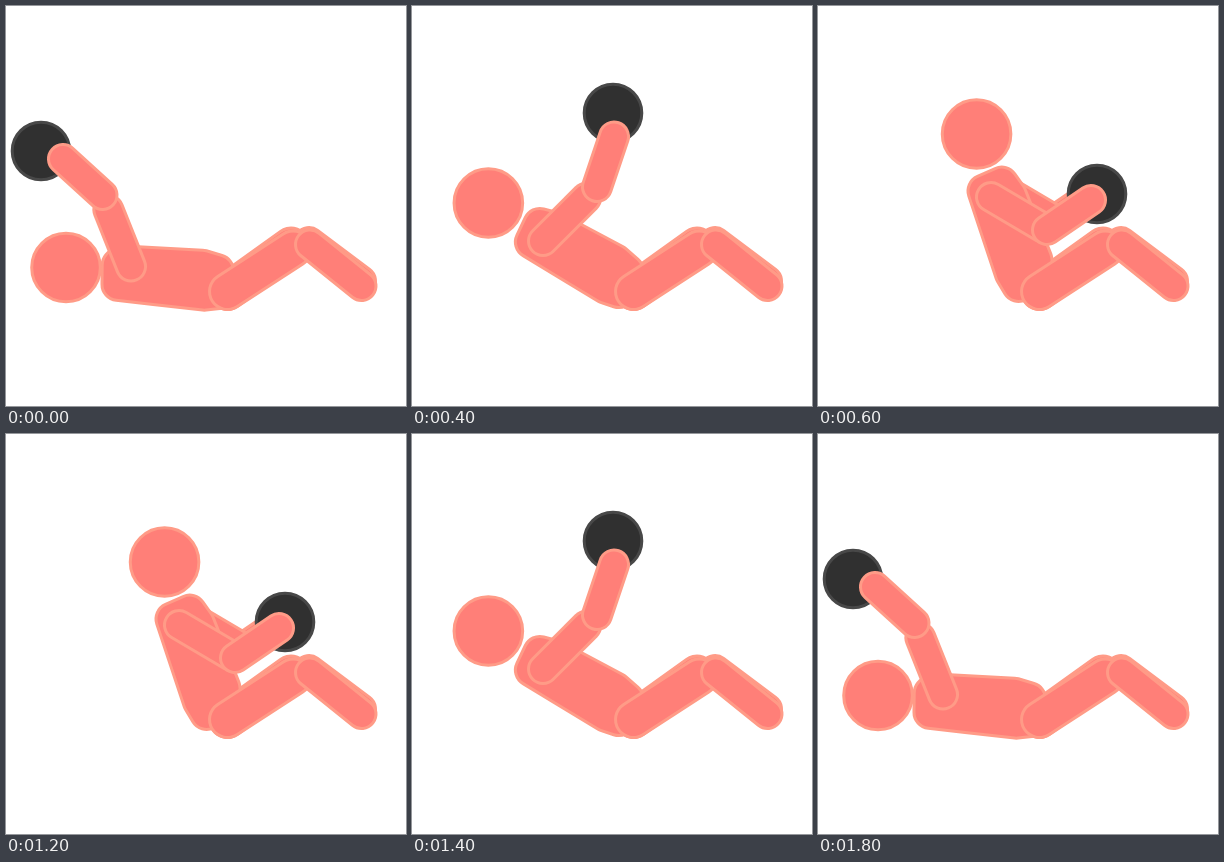
An HTML page with a canvas for the animation above (2 s loop, 400x400 px).

```html
<!DOCTYPE html>
<html lang="en">
<head>
<meta charset="utf-8">
<title>Sit-up with ball</title>
<style>
  html, body { margin: 0; width: 100%; height: 100%; overflow: hidden; background: #fff; }
  canvas { display: block; width: 400px; height: 400px; }
</style>
</head>
<body>
<canvas id="stage" width="400" height="400"></canvas>
<script>
const ctx = document.getElementById('stage').getContext('2d');

const SKIN = { fill: '#ff7f78', line: '#ff9b87' };
const BALL = { fill: '#303030', line: '#484848' };
const LINE_WIDTH = 3;
const ARM_WIDTH = 32;
const THIGH_WIDTH = 39;
const UPPER_ARM = 61;
const STEP_MS = 200;

const PIVOT = [212, 274];
const HIP = [221.5, 285.5];
// Torso corners as [along the spine, towards the chest], measured from the pivot.
const TORSO = [[115, -25], [117, 22], [88, 29], [15, 29], [-14, 22], [-18, -26], [12, -31]];

// lean: spine angle in degrees; neck: distance from the pivot to the head.
const POSES = [
  { lean: 3.1, neck: 152.5, shoulder: [125, 260.5], elbow: [96.5, 189], hand: [57, 153], ball: [35, 145] },
  { lean: 15.5, neck: 156, shoulder: [124, 247], elbow: [131, 175], hand: [111, 126], ball: [97, 112] },
  { lean: 28, neck: 156, shoulder: [131, 235], elbow: [185, 181], hand: [202, 130.5], ball: [201, 107] },
  { lean: 68.3, neck: 155.5, shoulder: [173, 191], elbow: [229, 224], hand: [273, 194], ball: [279, 188],
    farArm: [8, -10] },
  { lean: 85.5, neck: 147.2, shoulder: [198, 190.5], elbow: [228, 251], hand: [276, 275], ball: [285, 265],
    farArm: [10, -26] }
];

function paint({ fill, line }) {
  ctx.fillStyle = fill;
  ctx.strokeStyle = line;
  ctx.lineWidth = LINE_WIDTH;
  ctx.fill();
  ctx.stroke();
}

function disc(x, y, radius, colors) {
  ctx.beginPath();
  ctx.arc(x, y, radius, 0, Math.PI * 2);
  paint(colors);
}

function limb(from, to, width) {
  ctx.lineCap = 'round';
  ctx.beginPath();
  ctx.moveTo(...from);
  ctx.lineTo(...to);
  ctx.lineWidth = width;
  ctx.strokeStyle = SKIN.line;
  ctx.stroke();
  ctx.lineWidth = width - 2 * LINE_WIDTH;
  ctx.strokeStyle = SKIN.fill;
  ctx.stroke();
}

function roundedPolygon(points, radius) {
  const [x0, y0] = points[0];
  const [xn, yn] = points[points.length - 1];
  ctx.beginPath();
  ctx.moveTo((x0 + xn) / 2, (y0 + yn) / 2);
  points.forEach((point, i) => ctx.arcTo(...point, ...points[(i + 1) % points.length], radius));
  ctx.closePath();
  paint(SKIN);
}

function torso(lean) {
  const angle = lean * Math.PI / 180;
  const cos = Math.cos(angle), sin = Math.sin(angle);
  ctx.save();
  ctx.transform(-cos, -sin, sin, -cos, ...PIVOT);
  roundedPolygon(TORSO, 16);
  ctx.restore();
}

function head({ lean, neck }) {
  const angle = (lean + 1.6) * Math.PI / 180;
  disc(PIVOT[0] - neck * Math.cos(angle), PIVOT[1] - neck * Math.sin(angle), 34.3, SKIN);
}

function upperArm({ shoulder: [x, y], elbow }) {
  const dx = elbow[0] - x, dy = elbow[1] - y;
  const scale = UPPER_ARM / Math.hypot(dx, dy);
  limb([x, y], [x + dx * scale, y + dy * scale], ARM_WIDTH);
}

function forearm({ elbow, hand }) {
  limb(elbow, hand, ARM_WIDTH);
}

function farArm(pose) {
  if (!pose.farArm) return;
  ctx.save();
  ctx.translate(...pose.farArm);
  forearm(pose);
  upperArm(pose);
  ctx.restore();
}

function leg(thighEnd, knee, foot) {
  limb(HIP, thighEnd, THIGH_WIDTH);
  limb(knee, foot, ARM_WIDTH);
}

function draw(pose) {
  ctx.fillStyle = '#fff';
  ctx.fillRect(0, 0, 400, 400);
  farArm(pose);
  leg([285, 240], [303, 236], [355, 275]);
  disc(...pose.ball, 28.8, BALL);
  torso(pose.lean);
  head(pose);
  upperArm(pose);
  forearm(pose);
  leg([287, 243], [304, 238.5], [355.5, 280]);
}

const start = performance.now();
const last = POSES.length - 1;

// Poses play up and back down, with the first and last held twice as long.
function tick() {
  const step = Math.floor((performance.now() - start) / STEP_MS) % (2 * POSES.length);
  draw(POSES[step <= last ? step : 2 * last + 1 - step]);
  requestAnimationFrame(tick);
}
tick();
</script>
</body>
</html>
```
